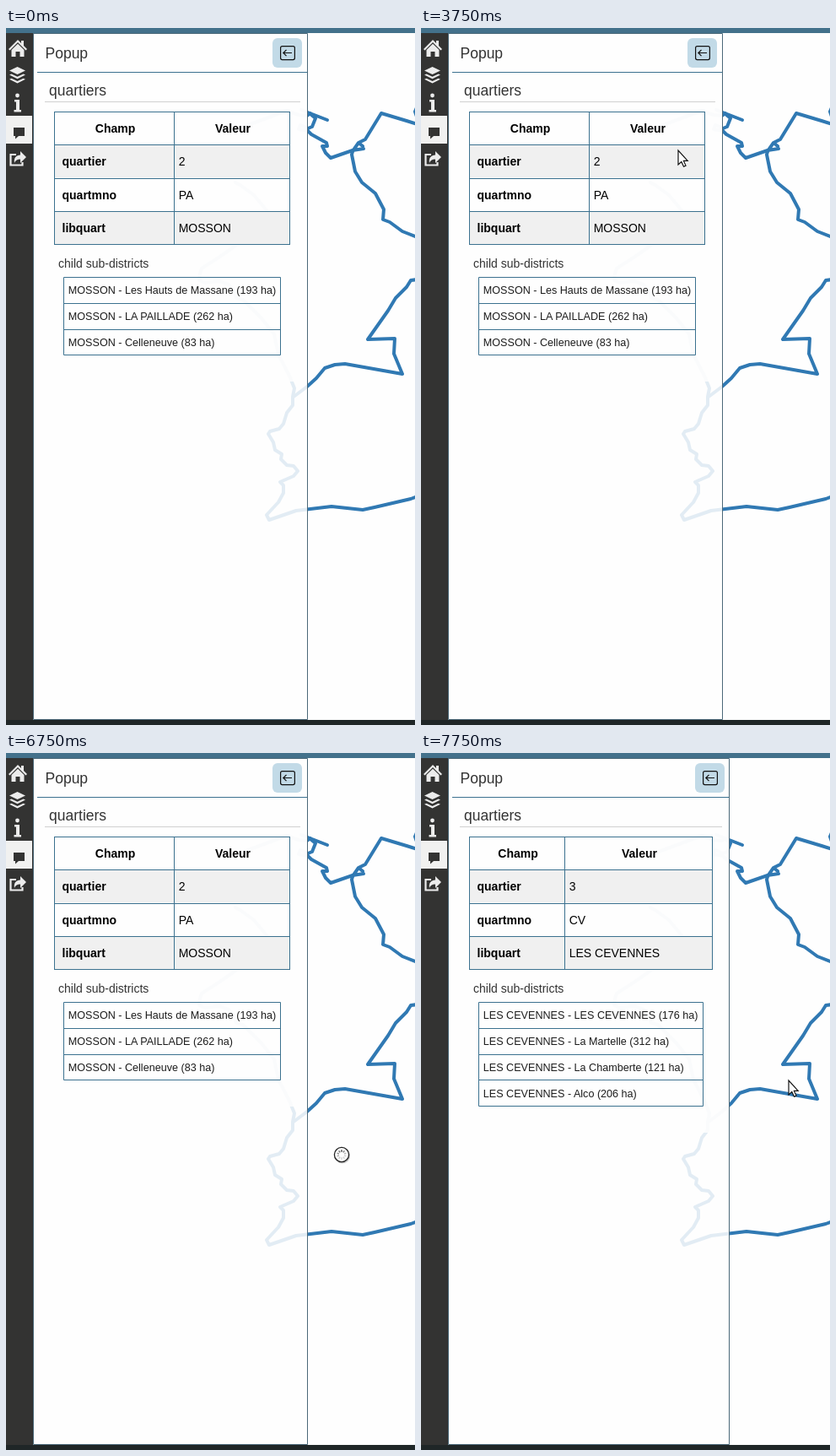
These frames come from a looping animation (485 by 826 pixels, 8000 ms). An HTML page:

```html
<!DOCTYPE html>
<html lang="fr">
<head>
<meta charset="utf-8">
<title>Popup</title>
<style>
  html, body { margin: 0; width: 100%; height: 100%; overflow: hidden; background: #fefefe; }
  svg { display: block; }
  text { font-family: "Liberation Sans", Arial, sans-serif; font-size: 14px; fill: #000; white-space: pre; }
  .title { font-size: 17.5px; fill: #333; }
  .note { fill: #333; }
  .small { font-size: 12.6px; fill: #1c1c1c; }
  .bold { font-weight: bold; }
  .mid { text-anchor: middle; }
  .map { fill: none; stroke: #3079b3; stroke-width: 4; stroke-linejoin: round; stroke-linecap: round; }
  .veil { fill: #fefefe; fill-opacity: .865; }
  .grid { fill: none; stroke: #3b718f; }

  .anim { animation: 8s step-end infinite; }
  #first { animation-name: first; }
  #second { animation-name: second; }
  #third { animation-name: third; }
  #arrow { animation-name: move; }
  #busy { animation-name: busy; }
  @keyframes first { 0% { visibility: visible } 87.5%, 100% { visibility: hidden } }
  @keyframes second { 0% { visibility: hidden } 87.5% { visibility: visible } 90.625%, 100% { visibility: hidden } }
  @keyframes third { 0% { visibility: hidden } 90.625%, 100% { visibility: visible } }
  @keyframes busy { 0% { visibility: hidden } 84.375% { visibility: visible } 87.5%, 100% { visibility: hidden } }
  @keyframes move {
    0% { transform: translate(176px, 11px); opacity: 0 }
    3.125% { transform: translate(176px, 11px); opacity: 1 }
    6.25% { transform: translate(245px, 85px) }
    9.375% { transform: translate(262px, 113px) }
    12.5% { transform: translate(274px, 126px) }
    15.625% { transform: translate(279px, 132px) }
    25% { transform: translate(280px, 133px) }
    28.125% { transform: translate(285px, 134px) }
    31.25% { transform: translate(299px, 139px) }
    34.375% { transform: translate(300px, 140px) }
    46.875% { transform: translate(304px, 144px) }
    50% { transform: translate(307px, 147px) }
    53.125% { transform: translate(311px, 152px) }
    56.25% { transform: translate(316px, 162px) }
    59.375% { transform: translate(326px, 186px) }
    62.5% { transform: translate(359px, 318px) }
    65.625% { transform: translate(369px, 436px) }
    68.75% { transform: translate(392px, 463px) }
    71.875% { transform: translate(397px, 474px); opacity: 1 }
    84.375% { transform: translate(397px, 474px); opacity: 0 }
    87.5% { transform: translate(397px, 474px); opacity: 1 }
    96.875%, 100% { transform: translate(435px, 387px); opacity: 1 }
  }
</style>
</head>
<body>
<svg width="485" height="826" viewBox="0 0 485 826">
  <g class="map">
    <path d="M270 122L279 118L333 98L347 103L357 104L361 101M350 97L381 109"/>
    <path d="M361 102L367 107L363 117L358 119L349 115L347 120L358 122L362 126L380 136L381 140L375 140L379 148L385 154L411 145L424 143M411 146L418 136L423 140M418 136L426 132L445 101L475 110L488 114M488 92L485 99L488 108"/>
    <path d="M411 146L410 150L414 170L422 183L438 196L448 215L447 227L455 230L470 241L488 248"/>
    <path d="M488 298L480 299L475 307L462 320L453 335L429 369L461 368L460 386L470 410L402 398L390 399L378 403L368 415L357 425L341 437"/>
    <path d="M272 183L279 187L294 198L309 216L302 238L279 253L258 268L232 285L230 291L229 299L236 302L253 300L264 304L270 311L273 320L281 322L303 344L318 363L323 387L336 412L342 427L340 437L340 447L333 456L329 469L324 475L313 478L311 481L317 491L319 500L327 505L326 511L333 518L341 519L346 525L341 531L325 538L329 542L329 551L323 562L309 577L312 583L344 572L386 567L423 571L437 568L480 558L488 555"/>
  </g>

  <g id="panels"></g>

  <path d="M0 0H485V6H0Z" fill="#43718b"/>
  <path d="M0 6H32V820H0Z" fill="#333332"/>
  <path d="M0 820H485V826H0Z" fill="#1f2627"/>
  <path d="M0 104H31V137H0Z" fill="#f1f1f0"/>

  <g fill="#ececec">
    <path d="M3 25L14 14L18 18V15H21V21L25 25L23.5 26.5L14 17L4.500 26.500Z"/>
    <path d="M6.500 26L14 18.800L21.500 26V34H16.500V28H11.500V34H6.500Z"/>
    <path d="M13.500 46L23 50.500L13.500 55L4 50.500Z"/>
    <path id="band" d="M4 55.500L6.500 54.400L13.500 57.700L20.500 54.400L23 55.500L13.500 60.200Z"/>
    <use href="#band" y="5.300"/>
    <circle cx="13.500" cy="80" r="2.400"/>
    <path d="M10 85H16V97H18V99.500H9.500V97H12V87.500H10Z"/>
    <path d="M17 146L24 153L17 160V155.500C13 155.500 11 157 10 160C9 154 12 150.500 17 150.500Z"/>
  </g>
  <path d="M12 150H5.500V162.500H19.500V159" fill="none" stroke="#ececec" stroke-width="2.200"/>
  <path d="M9 118H22V128H15L11 131.500V128H9Z" fill="#333332"/>

  <g id="busy" class="anim">
    <circle cx="398.700" cy="477" r="9.500" fill="#000" opacity=".2"/>
    <circle cx="398" cy="476" r="8.600" fill="#fefefe" stroke="#222" stroke-width="1.300"/>
    <g id="spokes" stroke-width="1.500"></g>
  </g>
  <path id="arrow" class="anim" d="M1 1V18L4.800 14.500L7.500 20.200L10 19.100L7.400 13.400H12.200Z" fill="#fff" stroke="#111" stroke-width="1.200"/>
</svg>

<script>
  const text = (x, y, s, cls = '') => `<text x="${x}" y="${y}" class="${cls}">${s}</text>`;
  const line = d => `<path class="grid" d="${d}"/>`;
  const LEFT = 57.5, ROWS = [99.5, 138.5, 178.5, 217.5, 256.5];
  const KEYS = ['quartier', 'quartmno', 'libquart'];

  function fieldTable(split, right, values) {
    const fill = y => `<path d="M${LEFT} ${y}H${right}V${y + 39}H${LEFT}Z" fill="#f0f0f0"/>`;
    const head = (a, b, s) => text((a + b) / 2 + 1, 124, s, 'bold mid');
    return fill(138.5) + fill(217.5)
      + ROWS.map(y => line(`M57 ${y}H${right + .5}`)).join('')
      + [LEFT, split, right].map(x => line(`M${x} 99V257`)).join('')
      + head(LEFT, split, 'Champ') + head(split, right, 'Valeur')
      + KEYS.map((k, i) => {
          const y = [163, 203, 242][i];
          return text(66.5, y, k, 'bold') + text(split + 5.2, y, values[i]);
        }).join('');
  }

  function childTable(right, items) {
    const edge = i => Math.floor(295.4 + i * 30.8) + .5;
    const end = edge(items.length);
    let out = text(62, 284, 'child sub-districts', 'note')
      + line(`M68.5 295.5H${right}V${end}H68.5Z`);
    items.forEach((s, i) => {
      if (i) out += line(`M68.5 ${edge(i)}H${right}`);
      out += text(73.8, 315 + i * 31, s, 'small');
    });
    return out;
  }

  function panel({ id, edge, button, split, right, values, childRight, items }) {
    const end = items ? 388 + (items.length - 3) * 31 : 257;
    return `<g id="${id}" class="anim">
      <path class="veil" d="M32 6H${edge}V820H32Z"/>
      <path class="veil" d="M32 53H${edge}V${end + 31}H32Z"/>
      <path d="M32 6.5H${edge - .5}V819.5H32.5V6" fill="none" stroke="#4b6878"/>
      ${line(`M37 52.5H${edge - 1}`)}
      <path d="M46 87.5H${edge - 9}" stroke="#d0d0d0"/>
      ${text(46.5, 36, 'Popup', 'title')}
      ${text(51, 80, 'quartiers', 'title')}
      <g transform="translate(${button} 12)">
        <rect width="35" height="35" rx="6" fill="#c2dae7"/>
        <g fill="none" stroke="#111" stroke-width="1.2">
          <rect x="9.600" y="9.600" width="16.800" height="16" rx="2"/>
          <path d="M23 17.500H13M16.500 13.800L12.800 17.500L16.500 21.200"/>
        </g>
      </g>
      ${fieldTable(split, right, values)}
      ${items ? childTable(childRight, items) : ''}
    </g>`;
  }

  document.getElementById('panels').innerHTML = [
    { id: 'first', edge: 358, button: 316, split: 199.5, right: 336.5,
      values: ['2', 'PA', 'MOSSON'], childRight: 325.5,
      items: ['MOSSON - Les Hauts de Massane (193 ha)', 'MOSSON - LA PAILLADE (262 ha)',
              'MOSSON - Celleneuve (83 ha)'] },
    { id: 'second', edge: 280, button: 239, split: 136.5, right: 259.5,
      values: ['3', 'CV', 'LES CEVENNES'] },
    { id: 'third', edge: 366, button: 325, split: 170.5, right: 345.5,
      values: ['3', 'CV', 'LES CEVENNES'], childRight: 334.5,
      items: ['LES CEVENNES - LES CEVENNES (176 ha)', 'LES CEVENNES - La Martelle (312 ha)',
              'LES CEVENNES - La Chamberte (121 ha)', 'LES CEVENNES - Alco (206 ha)'] }
  ].map(panel).join('');

  const spokes = [.8, .6, .3, .2, .2, .2, .25, .35, .5, .65];
  document.getElementById('spokes').innerHTML = spokes.map((o, i) =>
    `<path d="M398 470.300V472.800" stroke="#222" opacity="${o}" transform="rotate(${i * 36} 398 476)"/>`).join('');
</script>
</body>
</html>
```
